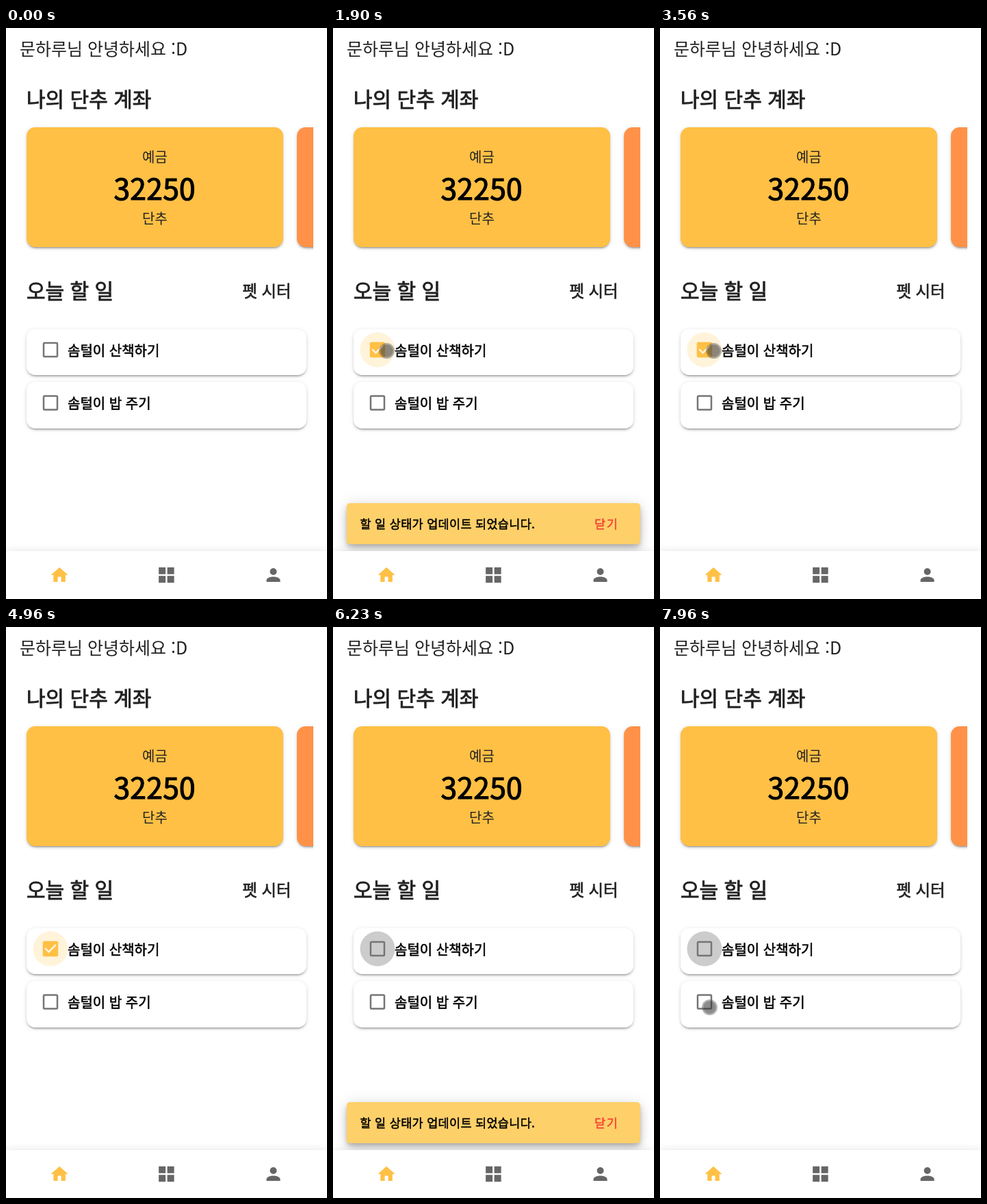
An HTML page for the animation above (8000 ms loop, 469x834 px).

```html
<!DOCTYPE html>
<html lang="ko">
<head>
<meta charset="utf-8">
<style>
  html, body { margin: 0; width: 100%; height: 100%; overflow: hidden; background: #fff; }
  body { font-family: "Noto Sans CJK KR", "Noto Sans KR", "Noto Sans CJK JP", "Noto Sans CJK SC", "Noto Sans CJK", "Noto Sans", sans-serif; }
  div, svg { position: absolute; }
  svg { left: 0; top: 0; overflow: visible; }
  text { fill: #000; white-space: pre; word-spacing: var(--gap, 0em); }
  .dark text, text.dark { fill: #212121; }
  .mid { stroke: #000; stroke-width: .028em; }
  .dark .mid { stroke: #212121; }
  .h2 { font-size: 30px; }
  .h3 { font-size: 23.4px; }
  .label { font-size: 20px; }
  .sum { font-size: 42.5px; letter-spacing: .0073em; }
  .card {
    border-radius: 12.5px;
    box-shadow: 0 3.75px 1.25px -2.5px rgba(0,0,0,.2), 0 2.5px 2.5px rgba(0,0,0,.14), 0 1.25px 6.25px rgba(0,0,0,.12);
  }
  #slides { left: 0; top: 130px; width: 448.75px; height: 205px; overflow: hidden; }
  #slides .card { top: 15px; height: 175px; width: 375px; }
  .todo { left: 30px; width: 408.75px; height: 67.5px; background: #fff; }
  #bar {
    left: 20px; top: 693.75px; width: 428.75px; height: 60px; border-radius: 5px; background: #fed069;
    box-shadow: 0 3.75px 6.25px -1.25px rgba(0,0,0,.2), 0 7.5px 12.5px rgba(0,0,0,.14), 0 1.25px 22.5px rgba(0,0,0,.12);
  }
  #bar text { font-size: 17.5px; letter-spacing: .0178em; }
  #bar .close { fill: #f44336; stroke: #f44336; letter-spacing: .089em; }
  #nav {
    left: 0; top: 763.75px; width: 469px; height: 71px; background: #fff;
    box-shadow: 0 2.5px 5px -1.25px rgba(0,0,0,.2), 0 5px 6.25px rgba(0,0,0,.14), 0 1.25px 12.5px rgba(0,0,0,.12);
  }
</style>
</head>
<body>
<div id="slides">
  <div class="card" style="left:30px;background:#ffc045"></div>
  <div class="card" style="left:425px;background:#ff9248"></div>
</div>
<div class="card todo" style="top:439.6px"></div>
<div class="card todo" style="top:517.1px"></div>

<svg width="469" height="834">
  <defs>
    <path id="box" d="M19 3H5c-1.11 0-2 .89-2 2v14a2 2 0 0 0 2 2h14a2 2 0 0 0 2-2V5a2 2 0 0 0-2-2m0 2v14H5V5h14z"/>
    <path id="checked" d="M10 17l-5-5 1.41-1.42L10 14.17l7.59-7.59L19 8m0-5H5c-1.11 0-2 .89-2 2v14a2 2 0 0 0 2 2h14a2 2 0 0 0 2-2V5a2 2 0 0 0-2-2z"/>
    <radialGradient id="touch">
      <stop offset=".72" stop-color="#333" stop-opacity=".62"/>
      <stop offset=".84" stop-color="#444" stop-opacity=".48"/>
      <stop offset="1" stop-color="#555" stop-opacity=".42"/>
    </radialGradient>
  </defs>
  <g class="dark">
    <text x="20" y="39.5" font-size="25">문하루님 안녕하세요 :D</text>
    <text class="h2 mid" x="30" y="115">나의 단추 계좌</text>
    <text class="h2 mid" x="30" y="395">오늘 할 일</text>
    <text class="h3 mid" x="345.5" y="393">펫 시터</text>
  </g>
  <g text-anchor="middle">
    <text class="label dark" x="217.5" y="196">예금</text>
    <text class="sum mid" x="217.2" y="250.5">32250</text>
    <text class="label dark" x="217.5" y="286">단추</text>
  </g>
  <circle id="focus" cx="65" cy="470" r="25.5" opacity=".2"/>
  <use id="check" transform="translate(50 455) scale(1.25)"/>
  <circle id="ripple" cx="65" cy="470"/>
  <use href="#box" fill="#757575" transform="translate(50 532.5) scale(1.25)"/>
  <text class="label mid" x="90" y="478.5">솜털이 산책하기</text>
  <text class="label mid" x="90" y="556">솜털이 밥 주기</text>
</svg>

<div id="bar">
  <svg width="429" height="60">
    <text class="mid" x="19.5" y="36.5">할 일 상태가 업데이트 되었습니다.</text>
    <text class="mid close" x="362" y="36.5">닫기</text>
  </svg>
</div>

<div id="nav">
  <svg width="469" height="70" fill="#666">
    <path fill="#ffc045" transform="translate(63.1 20) scale(1.25)" d="M10 20v-6h4v6h5v-8h3L12 3 2 12h3v8z"/>
    <path transform="translate(219.4 20) scale(1.25)" d="M3 11h8V3H3zm0 10h8v-8H3zm10 0h8v-8h-8zm0-18v8h8V3z"/>
    <path transform="translate(375.6 20) scale(1.25)" d="M12 4a4 4 0 1 1 0 8 4 4 0 0 1 0-8m0 10c4.42 0 8 1.79 8 4v2H4v-2c0-2.21 3.58-4 8-4z"/>
  </svg>
</div>
<svg width="469" height="834"><circle id="cursor" r="11.5" fill="url(#touch)"/></svg>

<script>
const LOOP = 8000, RATE = 0.015; // 15 screen updates per second
const YELLOW = [255, 192, 69], GRAY = [117, 117, 117], BLACK = [0, 0, 0];
const el = id => document.getElementById(id);
const [focusDot, check, ripple, bar, cursor] = ['focus', 'check', 'ripple', 'bar', 'cursor'].map(el);

// Keep word gaps at .224em whichever listed font supplies the space.
const pen = document.createElement('canvas').getContext('2d');
pen.font = '100px ' + getComputedStyle(document.body).fontFamily;
document.body.style.setProperty('--gap', .224 - pen.measureText(' ').width / 100 + 'em');

const clamp = v => Math.min(1, Math.max(0, v));
const mix = (a, b, p) => `rgb(${a.map((v, i) => v + (b[i] - v) * p)})`;

function bezier(x1, y1, x2, y2) {
  const at = (a, b, u) => 3 * a * u * (1 - u) ** 2 + 3 * b * u * u * (1 - u) + u ** 3;
  return x => {
    x = clamp(x);
    if (x === 0 || x === 1) return x;
    let lo = 0, hi = 1;
    for (let i = 0; i < 24; i++) {
      const u = (lo + hi) / 2;
      if (at(x1, x2, u) < x) lo = u; else hi = u;
    }
    return at(y1, y2, lo);
  };
}
const swing = bezier(.25, .8, .5, 1), enter = bezier(0, 0, .2, 1), leave = bezier(.4, 0, 1, 1);

const taps = [
  { toggle: 1380, ripple: 1425, fade: 1680, open: 1411, close: 3383 },
  { toggle: 5340, ripple: 5245, fade: 5485, open: 5345, close: 7316 }
];
const touches = [
  { from: 499, to: 4499, x: 78.5, y: 471.5, press: [1232, 1430] },
  { from: 4699, to: 4965, x: 66.5, y: 508, press: [4765, 4898] },
  { from: 5232, to: 6232, x: 66.5, y: 479.5, press: [5298, 5432] },
  { from: 6965, to: LOOP, x: 72.5, y: 555.5, press: [7899, 7965] }
];

// Snap to the update grid, whose starts fall on whole 10 ms.
function snap(t) {
  let k = Math.round(t * RATE);
  if (t >= Math.floor((k + .5) / RATE / 10) * 10) k++;
  return (k - .5) / RATE;
}

function draw(t) {
  const [on, off] = taps.map(a => swing((t - a.toggle) / 300));
  const marked = on > 0 && off === 0;
  check.setAttribute('href', marked ? '#checked' : '#box');
  check.setAttribute('fill', off > 0 ? mix(YELLOW, GRAY, off) : mix(GRAY, YELLOW, on));
  const tint = mix(YELLOW, BLACK, off);
  focusDot.setAttribute('fill', tint);
  focusDot.style.display = on > 0 ? '' : 'none';

  const tap = t < 4600 ? taps[0] : taps[1];
  const grow = (t - tap.ripple) / 250;
  ripple.setAttribute('r', 25.5 * (.4 + .6 * swing(grow)));
  ripple.setAttribute('fill', tint);
  ripple.setAttribute('opacity', grow > 0 ? .25 * (1 - clamp((t - tap.fade) / 215)) : 0);

  const shown = enter((t - tap.open) / 150);
  bar.style.opacity = shown * (1 - leave((t - tap.close) / 75));
  bar.style.transform = shown < 1 ? `scale(${.8 + .2 * shown})` : '';

  const touch = touches.find(c => t >= c.from && t < c.to);
  cursor.style.display = touch ? '' : 'none';
  if (touch) {
    const [down, up] = touch.press;
    cursor.setAttribute('cx', touch.x);
    cursor.setAttribute('cy', touch.y);
    cursor.setAttribute('opacity', t >= down && t < up ? 1 : .92);
  }
}

const start = performance.now();
function tick() {
  draw(snap((performance.now() - start) % LOOP));
  requestAnimationFrame(tick);
}
tick();
</script>
</body>
</html>
```
